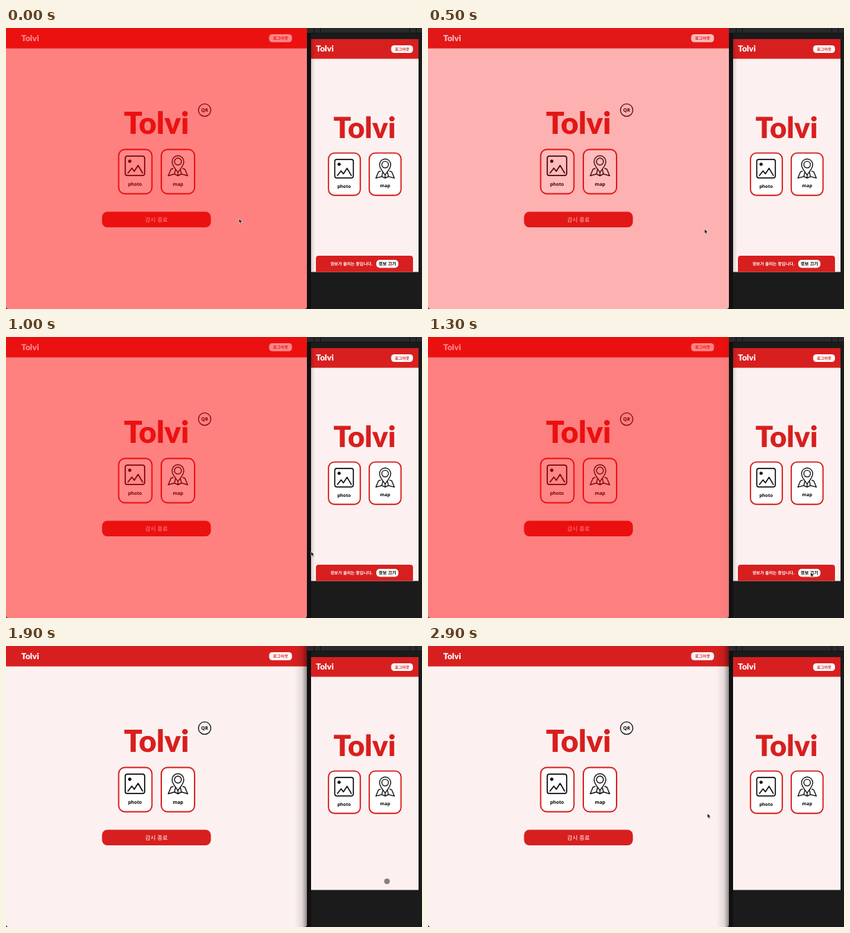
Recreate the animation shown at these times as an HTML page. Size 600 by 406 pixels, loop 3 s.

```html
<!DOCTYPE html>
<html lang="ko">
<head>
<meta charset="utf-8">
<style>
html, body { margin: 0; width: 100%; height: 100%; overflow: hidden; background: #1b1b1c; }
svg { display: block; width: 600px; height: 406px; }
text { font-family: "Noto Sans CJK KR", "Noto Sans CJK", sans-serif; text-anchor: middle; text-rendering: geometricPrecision; }
.logo { font-family: Lato, sans-serif; font-weight: 900; }
.small { font-size: 12px; text-anchor: start; fill: #fff; }
.bold { font-weight: 700; }
.label { font: 700 6.8px "Noto Sans", sans-serif; }
.red { fill: #d81f1f; }
.page { fill: #fcf1f0; }
.pill { fill: #fff; }
.line { fill: none; stroke: #111; stroke-width: 1.7; stroke-linejoin: round; stroke-linecap: round; }
.card { fill: #fff; stroke: #d81f1f; stroke-width: 1.9; }
</style>
</head>
<body>
<svg viewBox="0 0 600 406">
  <defs>
    <linearGradient id="toRight"><stop stop-opacity="0"/><stop offset=".6" stop-opacity=".1"/><stop offset="1" stop-opacity=".42"/></linearGradient>
    <linearGradient id="toLeft"><stop stop-opacity=".14"/><stop offset="1" stop-opacity="0"/></linearGradient>
    <clipPath id="window"><path d="M0 0H434V402Q434 406 430 406H4Q0 406 0 402Z"/></clipPath>
    <g id="home">
      <text class="logo red" y="-54.5" font-size="44">Tolvi</text>
      <rect class="card" x="-54.5" y="-32" width="48" height="64" rx="9"/>
      <rect class="card" x="7" y="-32" width="48" height="64" rx="9"/>
      <g class="line">
        <rect x="-45" y="-22.3" width="28" height="28" rx="3"/>
        <circle cx="-38.5" cy="-15" r="2" fill="#111" stroke-width="1"/>
        <path d="M-41 2L-35.5 -5 -32 -.5 -26.5 -9 -20 2"/>
        <g stroke-width="1.4">
          <path d="M31 1C27 -4 22.5 -9 22.5 -14.5A8.5 8.5 0 0 1 39.5 -14.5C39.5 -9 35 -4 31 1Z"/>
          <circle cx="31" cy="-14.5" r="5"/>
          <path d="M24 -4.5L21 -3.5 17 6 26 3.5 31 6 36 3.5 45 6 41 -3.5 38 -4.5M27.5 -3L26 3.5M34.5 -3L36 3.5M31 1V6"/>
        </g>
      </g>
      <text class="label" x="-31" y="20.3">photo</text>
      <text class="label" x="31" y="20">map</text>
    </g>
  </defs>

  <path fill="#29292b" d="M434 0H600V7H434Z"/>
  <path fill="none" stroke="#111" d="M434 7.5H600M444.5 0V7M453.5 0V7M582.5 0V7M591.5 0V7"/>
  <path fill="#111112" d="M434 8H440V406H434Z"/>

  <g clip-path="url(#window)">
    <path class="page" d="M0 0H434V406H0Z"/>
    <path class="red" d="M0 0H434V29.5H0Z"/>
    <text class="logo small" x="22" y="18.5">Tolvi</text>
    <rect class="pill" x="379.5" y="9" width="33" height="11.5" rx="4.5"/>
    <text class="bold red" x="396" y="16.8" font-size="6">로그아웃</text>
    <use href="#home" transform="translate(217 207.5)"/>
    <circle class="line" cx="286.5" cy="118.7" r="9" style="stroke-width:1.3"/>
    <text class="label" x="286.5" y="121.1">QR</text>
    <rect class="red" x="138.5" y="265.5" width="157" height="22.5" rx="7.5"/>
    <text x="217" y="279.6" font-size="8.2" fill="#fff">감시 종료</text>
    <path id="flash" fill="#f00" d="M0 0H434V406H0Z"/>
    <path id="shadeLeft" fill="url(#toRight)" d="M416 0H434V406H416Z"/>
  </g>

  <path class="page" d="M440 16H595V352.5H440Z"/>
  <path class="red" d="M440 16H595V44.5H440Z"/>
  <text class="logo small" x="447" y="34.2">Tolvi</text>
  <rect class="pill" x="555.5" y="25" width="31.5" height="11" rx="4.5"/>
  <text class="bold red" x="571.3" y="32.5" font-size="5.8">로그아웃</text>
  <use href="#home" transform="translate(517.2 211.2) scale(.955)"/>
  <g id="alert">
    <path class="red" d="M447 352.5V333Q447 329 451 329H583Q587 329 587 333V352.5Z"/>
    <text class="bold" x="498.3" y="343" font-size="6.05" fill="#fff">경보가 울리는 중입니다.</text>
    <rect class="pill" x="534" y="335" width="32" height="11.5" rx="5"/>
    <text class="bold" x="550" y="343.1" font-size="6.4">경보 끄기</text>
  </g>
  <path id="shadeRight" fill="url(#toLeft)" d="M440 16H446V352.5H440Z"/>

  <path id="arrow" d="M0 0V6.6L1.6 5.2 2.7 7.7 4 7.1 2.9 4.7H5Z" fill="#111" stroke="#fff" stroke-width=".6"/>
  <circle id="touch" r="4" fill="#444" fill-opacity=".65"/>
</svg>
<script>
const $ = id => document.getElementById(id);
const show = (id, on) => $(id).setAttribute("visibility", on ? "visible" : "hidden");
const fade = (id, value) => $(id).setAttribute("opacity", value);

// Eased value at t along [time, value] stops
function along(stops, t) {
  const i = stops.findIndex(s => s[0] > t);
  if (i < 0) return stops[stops.length - 1][1];
  if (!i) return stops[0][1];
  const [t0, a] = stops[i - 1], [t1, b] = stops[i];
  const p = (t - t0) / (t1 - t0);
  return a + (b - a) * p * p * (3 - 2 * p);
}

const pulse = [[0, .465], [200, .475], [300, .475], [700, .05], [800, .19], [1000, .465]];
const focus = [[1200, 0], [1700, 1]];
const pathX = [[0, 336], [300, 339], [650, 437], [1000, 440], [1250, 552], [1700, 549.5], [2150, 549.5], [2900, 403]];
const pathY = [[0, 275.5], [300, 275.5], [650, 300], [1000, 310], [1250, 340], [2150, 340], [2900, 242]];

function draw(now) {
  const t = now % 3000;
  const alarm = t < 1800;
  const phoneFocus = along(focus, t);
  const x = along(pathX, t), y = along(pathY, t);
  const touching = t >= 1500 && x > 440;
  fade("flash", alarm ? along(pulse, t % 1000) : 0);
  fade("shadeLeft", phoneFocus);
  fade("shadeRight", 1 - phoneFocus);
  show("alert", alarm);
  show("arrow", !touching && (t < 650 || t > 1000));
  show("touch", touching);
  for (const id of ["arrow", "touch"]) $(id).setAttribute("transform", `translate(${x} ${y})`);
}

const start = performance.now();
function tick() {
  draw(performance.now() - start);
  requestAnimationFrame(tick);
}
tick();
</script>
</body>
</html>
```
